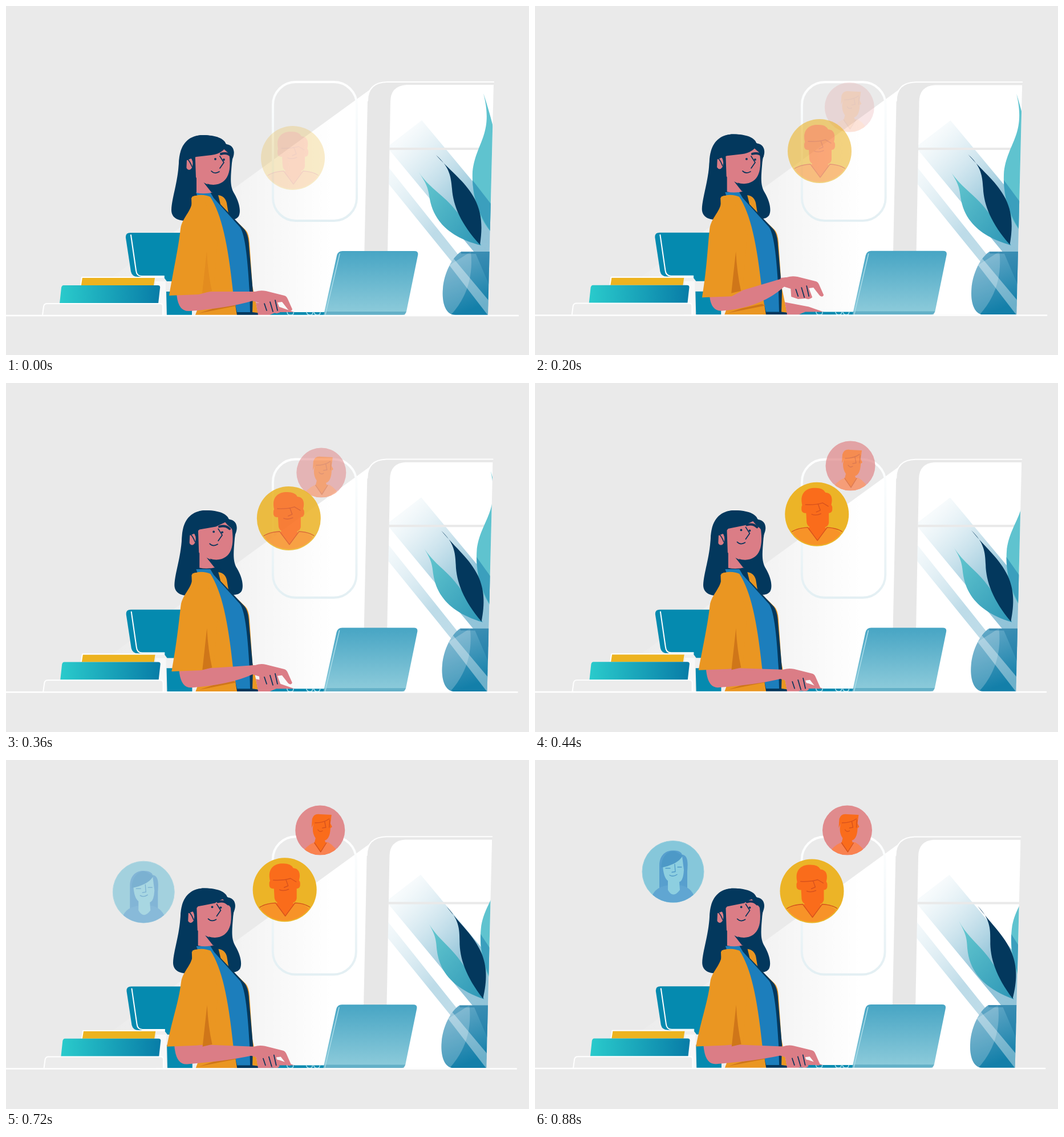
An HTML page for the animation above (920 ms loop, 917 by 611 pixels).

```html
<!DOCTYPE html>
<html lang="en">
<head>
<meta charset="utf-8">
<title>Online meeting</title>
<style>
html, body { margin: 0; height: 100%; overflow: hidden; background: #eaeaea }
svg { display: block; width: 100vw; height: 100vh }
.line { fill: none; stroke-linecap: round; stroke-linejoin: round }
.white { stroke: #fff; stroke-width: 2 }
.ink { stroke: #07345a; stroke-width: 1.7 }
.rust { stroke: #d7521d; stroke-width: 1.4 }
.navy { fill: #03385d }
.skin { fill: #db7d86 }
.coat { fill: #ea9622 }
.fold { fill: #cf7619 }
.shirt { fill: #1c7ebc }
.teal { fill: #058aaf }
.orange { fill: #fa6c1b }
</style>
</head>
<body>
<svg viewBox="0 0 917 611" preserveAspectRatio="none">
<defs>
  <linearGradient id="light" gradientUnits="userSpaceOnUse" x1="185" x2="570">
    <stop stop-color="#fff" stop-opacity=".1"/><stop offset=".55" stop-color="#fff" stop-opacity=".4"/><stop offset="1" stop-color="#fff"/>
  </linearGradient>
  <linearGradient id="frame" x2="0" y2="1"><stop stop-color="#fff"/><stop offset="1" stop-color="#e3eff3"/></linearGradient>
  <linearGradient id="beam" gradientUnits="userSpaceOnUse" x1="690" y1="235" x2="800" y2="350">
    <stop stop-color="#b9d9e6" stop-opacity=".12"/><stop offset="1" stop-color="#6db0cc" stop-opacity=".75"/>
  </linearGradient>
  <linearGradient id="book"><stop stop-color="#2acbcc"/><stop offset="1" stop-color="#087ca7"/></linearGradient>
  <linearGradient id="screen" x2="0" y2="1"><stop stop-color="#47a5c4"/><stop offset="1" stop-color="#8fccdb"/></linearGradient>
  <linearGradient id="leaf" x2="1" y2="1"><stop stop-color="#68cbd1"/><stop offset="1" stop-color="#2d96b6"/></linearGradient>
  <linearGradient id="pot" x2=".3" y2="1"><stop stop-color="#6faecb"/><stop offset="1" stop-color="#137fa9"/></linearGradient>
  <clipPath id="pane"><path d="M855 138H702Q674 140 674 168L667 541H845Z"/></clipPath>
  <clipPath id="potShape"><path d="M798 430H848V541H788C770 541 764 518 766 495C768 468 782 440 798 430Z"/></clipPath>
  <clipPath id="disc"><circle r="54"/></clipPath>
  <clipPath id="smallDisc"><circle r="43.5"/></clipPath>
</defs>

<g id="scene">
  <path fill="url(#light)" d="M640 145L185 475V541H640Z"/>
  <path fill="#e7e7e7" d="M855 133H668Q634 134 634 166L626 541H845Z"/>
  <path class="line white" d="M855 133H668Q634 134 634 166"/>

  <g clip-path="url(#pane)">
    <path fill="#fff" d="M660 130H860V545H660Z"/>
    <path fill="url(#beam)" d="M668 247L729 200L850 345V466Z"/>
    <path fill="url(#beam)" opacity=".6" d="M668 279L850 507V532L668 308Z"/>
    <path fill="#e9e9e9" d="M668 248H856V252H668Z"/>
    <g id="plant">
      <path fill="#5fc3cf" d="M837 153C856 225 823 240 818 290C816 340 832 375 850 395C890 340 858 215 837 153Z"/>
      <path fill="#3b9fbd" d="M818 305C820 345 835 375 850 395L853 350Z"/>
      <path fill="url(#leaf)" d="M723 290C738 312 740 318 743 338C750 375 775 404 833 419C815 385 800 372 782 350C762 328 740 316 723 290Z"/>
      <path class="navy" d="M754 261C778 282 780 298 782 320C784 350 798 382 831 418C836 385 834 362 822 338C806 308 782 292 754 261Z"/>
    </g>
    <g clip-path="url(#potShape)">
      <path fill="url(#pot)" d="M760 428H850V542H760Z"/>
      <path fill="#fff" opacity=".38" d="M772 427L850 520V548L762 434Z"/>
      <path fill="#fff" opacity=".22" d="M815 430Q822 495 780 541H760V465Z"/>
      <path fill="#1873a1" opacity=".45" d="M822 430H850V495ZM798 430H850V434H798Z"/>
    </g>
  </g>

  <rect x="468" y="133" width="147" height="243" rx="40" fill="none" stroke="url(#frame)" stroke-width="4"/>

  <path class="teal" d="M218 397H312V482H282L276 474H231Q221 474 219 465L210 406Q209 397 218 397ZM281 500H326V541H282Z"/>
  <path class="line white" d="M219 401L228 463Q229 473 238 473H277"/>
  <path fill="#f8f8f8" d="M262 482H280V541H262Z"/>
  <path fill="#edb31f" d="M133 476H261L259 489H131Z"/>
  <path class="line white" d="M131 488L133 475H277"/>
  <path fill="url(#book)" d="M101 489H266Q271 489 270 494L267 521H94L97 493Q98 489 101 489Z"/>
  <path fill="#ececec" class="white" d="M64 541L66 526Q67 521 72 521H270Q275 521 275 526V541"/>

  <path class="navy" id="hair" d="M303 275C304 240 322 226 345 226C368 226 384 232 386 243C400 246 398 262 396 275C394 300 392 315 400 328C410 345 412 360 408 368C402 378 380 376 368 365L320 376C300 377 290 370 290 357C291 335 301 310 303 275Z"/>

  <path class="coat" d="M371 331Q384 332 387 345L390 363L420 392Q426 398 427 415L432 490L442 538H420L370 345Z"/>
  <path class="navy" d="M356 327L372 331L376 347L417 390Q425 398 426 420L433 500L432 536L472 541H400L360 340Z"/>
  <path class="shirt" d="M333 326H358L364 336L410 387C420 400 424 450 427 500L428 536H405L396 500Z"/>
  <path class="coat" d="M325 336C336 328 350 331 358 334C378 365 389 415 398 500L405 541H332L345 505L330 480Z"/>
  <path class="fold" d="M362 530L398 522L404 525L338 538Z"/>
  <path class="skin" d="M438 519L480 527L520 541H442Z"/>
  <path class="teal" d="M462 541L474 536H560V541Z"/>
  <path fill="url(#screen)" d="M590 429H716Q724 429 722 437L702 535Q700 541 694 541H557L580 437Q582 429 590 429Z"/>
  <path fill="#2787aa" opacity=".4" d="M559 535H702L699 541H557Z"/>
  <path class="line" stroke="#a8dbe8" stroke-width="1.5" d="M585 434L560 540M493 536Q493 541 499 541T504 536M527 536Q528 541 533 541T538 536M540 536Q541 541 546 541T551 536"/>

  <path class="skin" id="arm"/>
  <g id="hand">
    <path class="skin" d="M426 501L437 500Q446 497 456 499L488 507Q492 508 494 513L502 531Q500 536 495 532L484 518L476 519L482 535Q477 540 470 537L457 538L445 534L444 520L428 515Z"/>
    <path class="line ink" stroke-width="1" d="M453 521L457 533M463 518L468 535M472 515L476 533"/>
  </g>
  <path class="coat" id="sleeve"/>
  <path class="fold" id="fold" d="M352 430L344 503L361 499Q354 468 352 430Z"/>

  <g id="head">
    <path class="skin" d="M334 285V327Q348 330 364 326L347 304Z"/>
    <path class="navy" d="M345 307Q352 314 362 314L373 330L360 326Z"/>
    <path class="skin" d="M331 242L376 236L391 256C395 285 391 300 380 308Q368 316 352 311Q340 308 333 300Z"/>
    <ellipse class="skin" cx="321" cy="276" rx="6.5" ry="11"/>
    <path class="line ink" d="M318 268Q322 271 326 281"/>
    <path class="navy" id="fringe"/>
    <path class="navy" d="M372 235L387 242C400 244 403 257 396 270Q393 259 387 255Q378 248 372 235Z"/>
  </g>
  <g id="face">
    <circle class="navy" cx="367" cy="268" r="1.9"/>
    <circle class="navy" cx="382" cy="269" r="1.9"/>
    <path class="line ink" d="M375 263L382 274L375 284M360 289Q366 295 374 290"/>
    <path class="line ink" style="stroke-width:4" d="M377 259Q388 256 395 263"/>
  </g>
  <path class="line white" style="stroke-width:2.5" d="M-10 542H898"/>
</g>

<g id="pinkMan">
  <circle r="43.5" fill="#e08b8d"/>
  <g clip-path="url(#smallDisc)">
    <path fill="#f98250" d="M-34 43Q-25 27 -10 21H14Q28 29 32 43Z"/>
    <path class="orange" d="M-11 -18L17 -19L18 -2Q17 15 8 18L10 22L1 38L-10 22L-8 14Q-13 7 -13 -3Z"/>
    <path class="orange" d="M-15 -4L-14 -20Q-11 -30 0 -28L20 -27L18 -12L21 -6L16 -2L14 -19L-10 -15Z"/>
    <path class="line rust" d="M-9 -13Q6 -13 16 -20M8 -15L10 -5L4 -4M-4 -1Q-1 4 4 1M-10 22L1 38L11 22M17 -18L16 -5"/>
  </g>
</g>
<g id="yellowMan">
  <circle r="56" fill="#ecb427"/>
  <g clip-path="url(#disc)">
    <path fill="#f79328" d="M-56 56Q-49 25 -16 23H18Q48 25 54 56Z"/>
    <path class="orange" d="M-20 -22H21V15Q20 21 14 23L16 26L1 46L-15 26L-13 22Q-17 20 -18 14Z"/>
    <rect class="orange" x="-27" y="-18" width="54" height="16" rx="6"/>
    <path class="orange" d="M-25 -13C-32 -36 -19 -47 -2 -46Q11 -46 15 -38C28 -37 28 -24 24 -13L18 -20L-20 -18Z"/>
    <path class="line rust" d="M-20 -17Q-3 -16 10 -20L20 -14M2 -18L6 -7L-1 -4M-9 0Q-2 3 7 -1M-54 40Q-42 24 -16 23L1 46L18 23Q43 24 54 40"/>
  </g>
</g>
<g id="blueWoman">
  <circle r="54" fill="#86c7da" stroke="#9ad0df"/>
  <g clip-path="url(#disc)">
    <path fill="#579fce" d="M-24 30V-12C-23 -32 -10 -38 2 -37Q13 -37 16 -30C27 -28 26 -15 25 0V36Z"/>
    <path fill="#60a6d2" d="M-40 54Q-36 27 -10 24H14Q36 28 40 54Z"/>
    <path fill="#8dcfe0" d="M-18 -12L16 -27L19 -3Q18 16 11 18L12 32Q0 48 -9 32L-9 16Q-17 10 -18 -12Z"/>
    <path fill="#4d99c7" d="M-21 -7C-20 -30 -7 -37 3 -36L17 -28Q9 -13 -21 -7Z"/>
    <path class="line" stroke="#4d99c7" stroke-width="1.3" d="M3 -13L4 0L-2 1M-6 6Q0 10 7 5M-13 -6H-5M8 -8H15"/>
  </g>
</g>
</svg>

<script>
const LOOP = 920, STEP = 40, END = LOOP - STEP;

const set = (id, name, value) => document.getElementById(id).setAttribute(name, value);
const move = (id, x, y) => set(id, 'transform', `translate(${x} ${y})`);
const ramp = (t, from, to) => Math.min(1, Math.max(0, (t - from) / (to - from)));
const ease = (t, from, to) => { const k = ramp(t, from, to); return k * k * (3 - 2 * k); };
const swing = (t, from, to) => Math.sin(Math.PI * ramp(t, from, to));

function avatar(id, x, y, alpha) {
  move(id, x, y);
  set(id, 'opacity', alpha);
}

function drawSetting(p) {
  set('scene', 'transform', `translate(440 310) scale(${1 - 0.0083 * p}) translate(-440 -310)`);
  set('plant', 'transform', `rotate(${5.4 * p} 829 523)`);
}

function drawWoman(t) {
  const settle = ease(t, 0, 560);
  const nod = swing(t, 120, 560);
  const turn = ease(t, 180, 460);
  const tap = swing(t, 0, 440) ** 2;

  for (const id of ['hair', 'head']) move(id, 2 * settle + 3.5 * nod, -2 * settle - 2 * nod);
  move('face', 4 * ramp(t, 0, 200) - 10 * turn, -11 * turn);
  set('fringe', 'd', `M303 290C301 245 322 226 345 226Q372 226 387 243
    Q${382 - 6 * turn} ${258 - 14 * turn} ${360 + 4 * turn} ${261 - 9 * turn}
    L334 ${264 - 6 * turn}L327 266L317 270L316 292Z`);

  const handX = 5 * tap - 2 * settle, handY = 3 * settle - 26 * tap;
  const cuffX = 286 - 5 * settle + 5 * tap + 6 * nod, cuffY = 507 - 4 * settle + 5 * tap;
  const elbow = cuffX + 13;
  move('hand', handX, handY);
  set('arm', 'd', `M${elbow} ${cuffY - 5}Q${elbow + 2} 536 ${elbow + 23} 534
    Q${elbow + 90} 529 ${433 + handX} ${516 + handY}L${436 + handX} ${500 + handY}L365 ${500 + handY * .1}Z`);
  set('sleeve', 'd', `M326 334Q333 330 345 333L372 400L364 498L${cuffX + 52} ${cuffY - 2}L${cuffX} ${cuffY}
    C${cuffX + 9} 455 302 425 306 390C309 368 330 357 326 334Z`);
  set('fold', 'opacity', .3 + .7 * ramp(t, 0, 200));
}

function drawAvatars(t, p) {
  avatar('yellowMan', 503 - 17.5 * p, 266 - 41 * ease(t, 0, 560) + 4.5 * ease(t, 560, END), ramp(t, -140, 440));
  avatar('pinkMan', 553 - 5.5 * (2 * p - 1) ** 2, 182 - 59 * ease(t, 100, 680), ramp(t, 100, 560));
  avatar('blueWoman', 238 + 4 * p, 243 - 47.5 * ramp(t, 560, END) ** 2, ramp(t, 440, 840));
}

function tick() {
  const t = Math.floor(performance.now() % LOOP / STEP) * STEP;
  drawSetting(t / END);
  drawWoman(t);
  drawAvatars(t, t / END);
  requestAnimationFrame(tick);
}
tick();
</script>
</body>
</html>
```
